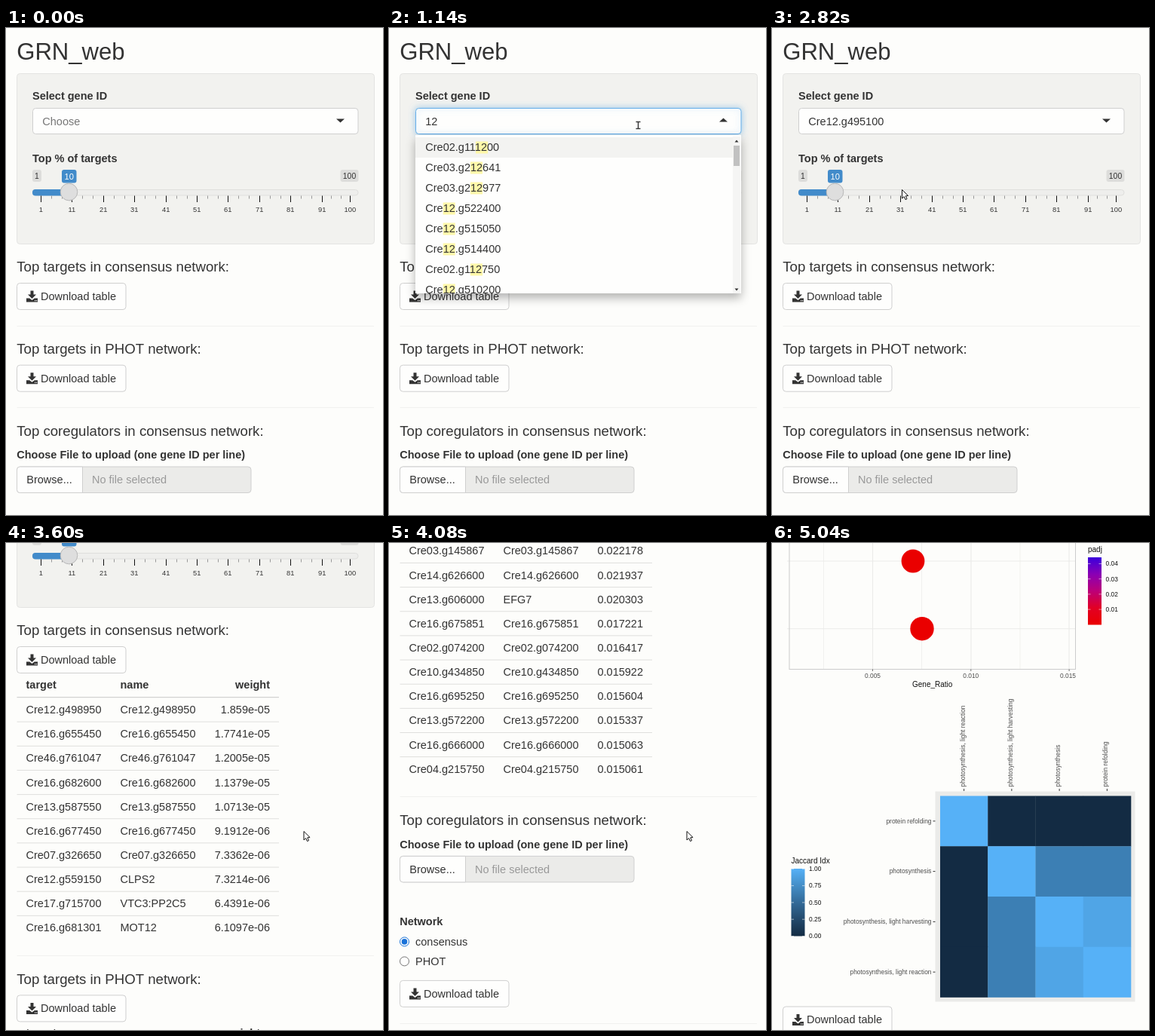
Animation of 500x646 px, one loop 5.1 s. Source, as an HTML page with a canvas:

```html
<!DOCTYPE html>
<html lang="en">
<head>
<meta charset="utf-8">
<title>GRN_web</title>
<style>
html, body { margin: 0; width: 100%; height: 100%; overflow: hidden; background: #fdfdfb; }
canvas { display: block; width: 500px; height: 646px; }
</style>
</head>
<body>
<canvas id="stage"></canvas>
<script>
const W = 500, H = 646, LOOP = 5100, STEP = 60;
const BODY = 14.5, HEAD = 18.65, SMALL = 8.4, TITLE = 10;
const INK = '#333333', SOFT = '#4d4d4d', PAPER = '#fdfdfb', WHITE = '#fefefd';
const WELL = '#f2f2ef', EDGE = '#cfcfcf', BLUE = '#428bca';
const TABLE_H = 353.7, PLOT_Y = 1680;

const canvas = document.getElementById('stage');
const g = canvas.getContext('2d');
const dpr = window.devicePixelRatio || 1;
canvas.width = W * dpr;
canvas.height = H * dpr;

const consensus = [
  ['Cre12.g498950', '', '1.859e-05'], ['Cre16.g655450', '', '1.7741e-05'],
  ['Cre46.g761047', '', '1.2005e-05'], ['Cre16.g682600', '', '1.1379e-05'],
  ['Cre13.g587550', '', '1.0713e-05'], ['Cre16.g677450', '', '9.1912e-06'],
  ['Cre07.g326650', '', '7.3362e-06'], ['Cre12.g559150', 'CLPS2', '7.3214e-06'],
  ['Cre17.g715700', 'VTC3:PP2C5', '6.4391e-06'], ['Cre16.g681301', 'MOT12', '6.1097e-06']
];
const phot = [
  ['Cre03.g145867', '', '0.022178'], ['Cre14.g626600', '', '0.021937'],
  ['Cre13.g606000', 'EFG7', '0.020303'], ['Cre16.g675851', '', '0.017221'],
  ['Cre02.g074200', '', '0.016417'], ['Cre10.g434850', '', '0.015922'],
  ['Cre16.g695250', '', '0.015604'], ['Cre13.g572200', '', '0.015337'],
  ['Cre16.g666000', '', '0.015063'], ['Cre04.g215750', '', '0.015061']
];
const genes = [];
for (let i = 0; i < 8; i++) genes.push('Cre01.g00' + (3050 + i * 450));
genes.push('Cre02.g111200', 'Cre03.g212641', 'Cre03.g212977', 'Cre12.g522400',
  'Cre12.g515050', 'Cre12.g514400', 'Cre02.g112750', 'Cre12.g510200');
for (let i = 0; i < 9; i++) genes.push('Cre12.g495' + (100 + i * 50));

// [time, value...] keys with linear motion between them
function track(keys, t) {
  if (t <= keys[0][0]) return keys[0].slice(1);
  for (let i = 1; i < keys.length; i++) {
    const a = keys[i - 1], b = keys[i];
    if (t <= b[0]) {
      const k = (t - a[0]) / (b[0] - a[0]);
      return a.slice(1).map((v, j) => v + (b[j + 1] - v) * k);
    }
  }
  return keys[keys.length - 1].slice(1);
}

const mouseKeys = [[60, 440, 560], [180, 380, 260], [300, 330, 129], [1620, 330, 129],
  [1860, 140, 160], [2040, 140, 162], [2640, 172, 214], [2880, 172, 214], [3240, 394.5, 382]];
const scrollKeys = [[3300, 0], [3420, 45], [3540, 135], [3780, 400], [4080, 873.5],
  [4200, 1090], [4380, 1500], [4500, PLOT_Y], [4620, PLOT_Y + 55], [4800, PLOT_Y + 89.5]];

const OPEN = 360, CLOSE = 1980, TABLES = 3000;
function typed(t) {
  if (t < 840) return '';
  if (t < 1020) return '1';
  if (t < 1200) return '12';
  return '12.g4951'.slice(0, 3 + Math.floor((t - 1200) / STEP));
}

function text(s, x, y, size = BODY, color = INK, align = 'left', weight = '') {
  g.font = `${weight} ${size}px "Liberation Sans", Arial, sans-serif`;
  g.fillStyle = color;
  g.textAlign = align;
  g.fillText(s, x, Math.round(y + size * 0.335));
}
const bold = (s, x, y, align) => text(s, x, y, BODY, INK, align, 'bold');

function rect(x, y, w, h, color) {
  g.fillStyle = color;
  g.fillRect(x, y, w, h);
}
function paint(fill, edge) {
  if (fill) { g.fillStyle = fill; g.fill(); }
  if (edge) { g.strokeStyle = edge; g.lineWidth = 1; g.stroke(); }
}
function box(x, y, w, h, r, fill, edge) {
  g.beginPath();
  g.roundRect(x, y, w, h, r);
  paint(fill, edge);
}
function line(x1, y1, x2, y2, color, width = 1) {
  g.strokeStyle = color;
  g.lineWidth = width;
  g.beginPath();
  g.moveTo(x1, y1);
  g.lineTo(x2, y2);
  g.stroke();
}
function poly(points, fill, edge) {
  g.beginPath();
  points.forEach(([x, y]) => g.lineTo(x, y));
  g.closePath();
  paint(fill, edge);
}
function disc(x, y, r, fill, edge) {
  g.beginPath();
  g.arc(x, y, r, 0, Math.PI * 2);
  paint(fill, edge);
}
function rule(y) {
  const cy = Math.round(y) + 0.5;
  line(14.5, cy, 488, cy, '#f1f1ef');
}

function download(y) {
  box(14.5, y - 17.5, 144.5, 35, 4, WHITE, EDGE);
  g.save();
  g.translate(27, y - 7.5);
  poly([[5.5, 0], [9.5, 0], [9.5, 5], [13, 5], [7.5, 10.5], [2, 5], [5.5, 5]], INK);
  poly([[0, 10], [4.2, 10], [7.5, 12.6], [10.8, 10], [15, 10], [15, 15], [0, 15]], INK);
  rect(11, 12.5, 1.2, 1.2, WHITE);
  rect(13, 12.5, 1.2, 1.2, WHITE);
  g.restore();
  text('Download table', 46, y);
}

function table(rows, y, right) {
  const end = right + 12;
  bold('target', 26.5, y);
  bold('name', 151.5, y);
  bold('weight', right, y, 'right');
  line(14.5, y + 16.5, end, y + 16.5, '#d2d2d2', 1.2);
  rows.forEach(([id, name, weight], i) => {
    const cy = y + 33 + i * 32.15;
    if (i) line(14.5, cy - 16.2, end, cy - 16.2, '#dfdfdd');
    text(id, 26.5, cy);
    text(name || id, 151.5, cy);
    text(weight, right, cy, BODY, INK, 'right');
  });
}

function slider() {
  bold('Top % of targets', 35, 173);
  box(35, 188, 12, 16, 3, '#dddddb');
  text('1', 41, 196.5, 10.4, INK, 'center');
  box(443.5, 188, 24, 16, 3, '#dddddb');
  text('100', 455.5, 196.5, 10.4, INK, 'center');
  box(74, 188, 19.5, 17.5, 3, BLUE);
  text('10', 83.7, 197, 11.2, WHITE, 'center');
  box(35.5, 214.5, 431.5, 7.5, 4, '#eeeeec', '#dfdfdd');
  box(35, 214, 49, 8.5, 4, BLUE);
  for (let v = 1; v <= 101; v += 10) {
    const at = Math.min(v, 100), x = Math.round(46 + (at - 1) * 4.14);
    line(x + 0.5, 222.5, x + 0.5, 231, '#111111');
    text(at, x + 0.3, 240.5, 9.35, INK, 'center');
    const gap = (v === 91 ? 9 : 10) * 4.14 / 3;
    if (v < 100) for (let k = 1; k < 3; k++) {
      const m = Math.round(x + k * gap) + 0.5;
      line(m, 222.5, m, 226.5, '#999999');
    }
  }
  disc(83.5, 217.5, 11.3, '#dedede', '#b8b8b8');
}

function select(t) {
  const open = t >= OPEN && t < CLOSE;
  if (open) {
    g.save();
    g.shadowColor = 'rgba(102,175,233,.6)';
    g.shadowBlur = 8;
    box(35.5, 106.5, 431.5, 34, 4, WHITE, '#66afe9');
    g.restore();
    poly([[438, 124.5], [449, 124.5], [443.5, 119.5]], INK);
  } else {
    box(35.5, 106.5, 431.5, 34, 4, WHITE, EDGE);
    poly([[438, 120.5], [449, 120.5], [443.5, 125.5]], INK);
  }
  const value = t >= CLOSE ? 'Cre12.g495100' : open ? typed(t) : '';
  if (value) text(value, 48.3, 124);
  else if (!open) text('Choose', 48.3, 124, BODY, '#777777');
}

function menu(t) {
  const word = typed(t);
  const list = genes.filter(s => s.includes(word)).slice(0, 8);
  const full = list.length === 8;
  const h = full ? 210 : list.length * 27 + 6;
  g.save();
  g.shadowColor = 'rgba(0,0,0,.3)';
  g.shadowBlur = 12;
  g.shadowOffsetY = 6;
  rect(35, 142, 432, h, WHITE);
  g.restore();
  g.save();
  g.beginPath();
  g.rect(35, 142, 432, h);
  g.clip();
  list.forEach((s, i) => {
    const y = 158.5 + i * 27;
    if (i === 0) rect(35, y - 13.5, 421, 27, '#f3f3f1');
    if (word) {
      g.font = `${BODY}px "Liberation Sans", Arial, sans-serif`;
      const x = 48.3 + g.measureText(s.slice(0, s.indexOf(word))).width;
      rect(x, y - 8, g.measureText(word).width, 16, '#fff8a9');
    }
    text(s, 48.3, y);
  });
  if (full) {
    rect(456, 144, 10, 208, '#f5f5f4');
    rect(457, 156, 8, 27, '#c1c1c1');
    poly([[458.5, 151.5], [463.5, 151.5], [461, 148.5]], INK);
    poly([[458.5, 345.5], [463.5, 345.5], [461, 348.5]], INK);
  }
  g.restore();
}

function coregulators(y) {
  rule(y - 31.5);
  text('Top coregulators in consensus network:', 14.2, y, HEAD);
  bold('Choose File to upload (one gene ID per line)', 14.2, y + 32);
  box(14.5, y + 47.5, 310.5, 34.5, 4, '#ebebe9', EDGE);
  box(14.5, y + 47.5, 87, 34.5, [4, 0, 0, 4], WHITE, EDGE);
  text('Browse...', 27.3, y + 65);
  text('No file selected', 114, y + 65, BODY, '#999999');
  bold('Network', 14.2, y + 134.5);
  disc(20.5, y + 161, 6, WHITE, '#1a73d9');
  disc(20.5, y + 161, 3.8, '#1a73d9');
  text('consensus', 35, y + 161);
  disc(20.5, y + 187, 6, WHITE, '#767676');
  text('PHOT', 35, y + 187);
  download(y + 230);
  rule(y + 269);
}

function ramp(x, y, w, h, stops) {
  const grad = g.createLinearGradient(0, y, 0, y + h);
  stops.forEach((c, i) => grad.addColorStop(i / (stops.length - 1), c));
  rect(x, y, w, h, grad);
}
function scaleLabels(x, y, gap, labels) {
  labels.forEach((s, i) => {
    const cy = y + i * gap;
    line(x, cy, x + 3.5, cy, 'rgba(255,255,255,.7)', 0.8);
    line(x + 14.5, cy, x + 18, cy, 'rgba(255,255,255,.7)', 0.8);
    text(s, x + 23.5, cy, SMALL, '#111111');
  });
}

function dotPlot() {
  const grid = '#ebebe9';
  const dots = [[340, -66, 18], [297, 24, 17.3], [187, 114, 15.4], [199, 203.7, 15.7]];
  [68.5, 133.5, 198.5, 264, 329, 394].forEach((x, i) =>
    line(x, -120, x, 257, grid, i % 2 ? 1.1 : 0.7));
  dots.forEach(([, y]) => line(20, y, 403, y, grid, 1.1));
  g.strokeStyle = '#cccccc';
  g.lineWidth = 1;
  g.strokeRect(23, -120, 379.5, 377.5);
  dots.forEach(([x, y, r]) => disc(x, y, r, '#ea0000'));
  ['0.005', '0.010', '0.015'].forEach((s, i) => {
    const x = 133.5 + i * 130.3;
    line(x, 257.5, x, 260, INK, 0.7);
    text(s, i === 2 ? 392.5 : x, 266.5, SMALL, SOFT, 'center');
  });
  text('Gene_Ratio', 212.7, 278, TITLE, '#111111', 'center');
  [[-62, 10, 5], [-28, 13.5, 10], [9.5, 15.2, 15], [49.5, 16.5, 20]].forEach(([y, r, n]) => {
    disc(440, y, r, '#000000');
    text(n, 467, y, SMALL, '#111111');
  });
  text('padj', 419, 99, TITLE, '#111111');
  ramp(419, 109, 18, 89.5, ['#3a00dc', '#8a00b4', '#bc0078', '#e20024', '#ea0000']);
  scaleLabels(419, 117.5, 20.2, ['0.04', '0.03', '0.02', '0.01']);
}

function heatmap() {
  const names = ['protein refolding', 'photosynthesis', 'photosynthesis, light harvesting',
    'photosynthesis, light reaction'];
  const tones = { k: '#132b43', l: '#56b1f7', m: '#3c7fb4', g: '#50a5e6' };
  const cw = 63.25, ch = 66.75;
  rect(216.5, 419.5, 265, 279, '#ebebe9');
  ['lkkk', 'klmm', 'kmlg', 'kmgl'].forEach((row, i) => {
    const y = 425.5 + i * ch;
    [...row].forEach((c, j) => rect(223 + j * cw, y, cw + 0.3, ch + 0.3, tones[c]));
    line(213.5, y + ch / 2, 216.5, y + ch / 2, INK);
    text(names[i], 211.5, y + ch / 2, SMALL, SOFT, 'right');
    const x = 223 + (i + 0.5) * cw;
    line(x, 416, x, 419, INK);
    g.save();
    g.translate(x - 2, 413.5);
    g.rotate(-Math.PI / 2);
    text(names[3 - i], 0, 0, SMALL, SOFT);
    g.restore();
  });
  text('Jaccard Idx', 25.5, 511.5, TITLE, '#111111');
  ramp(25.5, 522, 18, 89.5, ['#56b1f7', '#448ec7', '#336a98', '#234a6c', '#132b43']);
  scaleLabels(25.5, 522.3, 22.3, ['1.00', '0.75', '0.50', '0.25', '0.00']);
}

function pointer(t) {
  if (t < 60 || t >= 4920) return;
  const [x, y] = track(mouseKeys, t);
  g.save();
  g.translate(x, y);
  if (t >= 300 && t <= 1620) {
    line(0.5, -4, 0.5, 4, INK, 1.4);
    line(-2.5, -4.5, 3.5, -4.5, INK, 1.4);
    line(-2.5, 4.5, 3.5, 4.5, INK, 1.4);
  } else {
    poly([[0.5, 0.5], [0.5, 12], [3.2, 9.6], [5, 13.6], [7, 12.7], [5.3, 8.8], [8.6, 8.5]],
      WHITE, '#111111');
  }
  g.restore();
}

function draw(t) {
  g.setTransform(dpr, 0, 0, dpr, 0, 0);
  rect(0, 0, W, H, PAPER);
  const ready = t >= TABLES;
  const extra = ready ? TABLE_H : 0;
  g.save();
  g.translate(0, -Math.round(track(scrollKeys, t)[0]));

  text('GRN_web', 14.2, 31.3, 31.1);
  box(14.5, 60.5, 474, 226, 4, WELL, '#e4e4e2');
  bold('Select gene ID', 35, 90.5);
  select(t);
  slider();

  text('Top targets in consensus network:', 14.2, 317.2, HEAD);
  download(356);
  if (ready) table(consensus, 389.2, 350);

  const photY = 425.8 + extra;
  rule(photY - 31.3);
  text('Top targets in PHOT network:', 14.2, photY, HEAD);
  download(photY + 38.9);
  if (ready) table(phot, photY + 72, 337);

  coregulators(534.5 + extra * 2);
  if (ready) {
    g.save();
    g.translate(0, PLOT_Y);
    dotPlot();
    heatmap();
    download(722.5);
    g.restore();
  }
  if (t >= OPEN && t < CLOSE) menu(t);
  g.restore();
  pointer(t);
}

const start = performance.now();
function frame() {
  const t = (performance.now() - start) % LOOP;
  draw(Math.floor(t / STEP) * STEP);
  requestAnimationFrame(frame);
}
frame();
</script>
</body>
</html>
```
